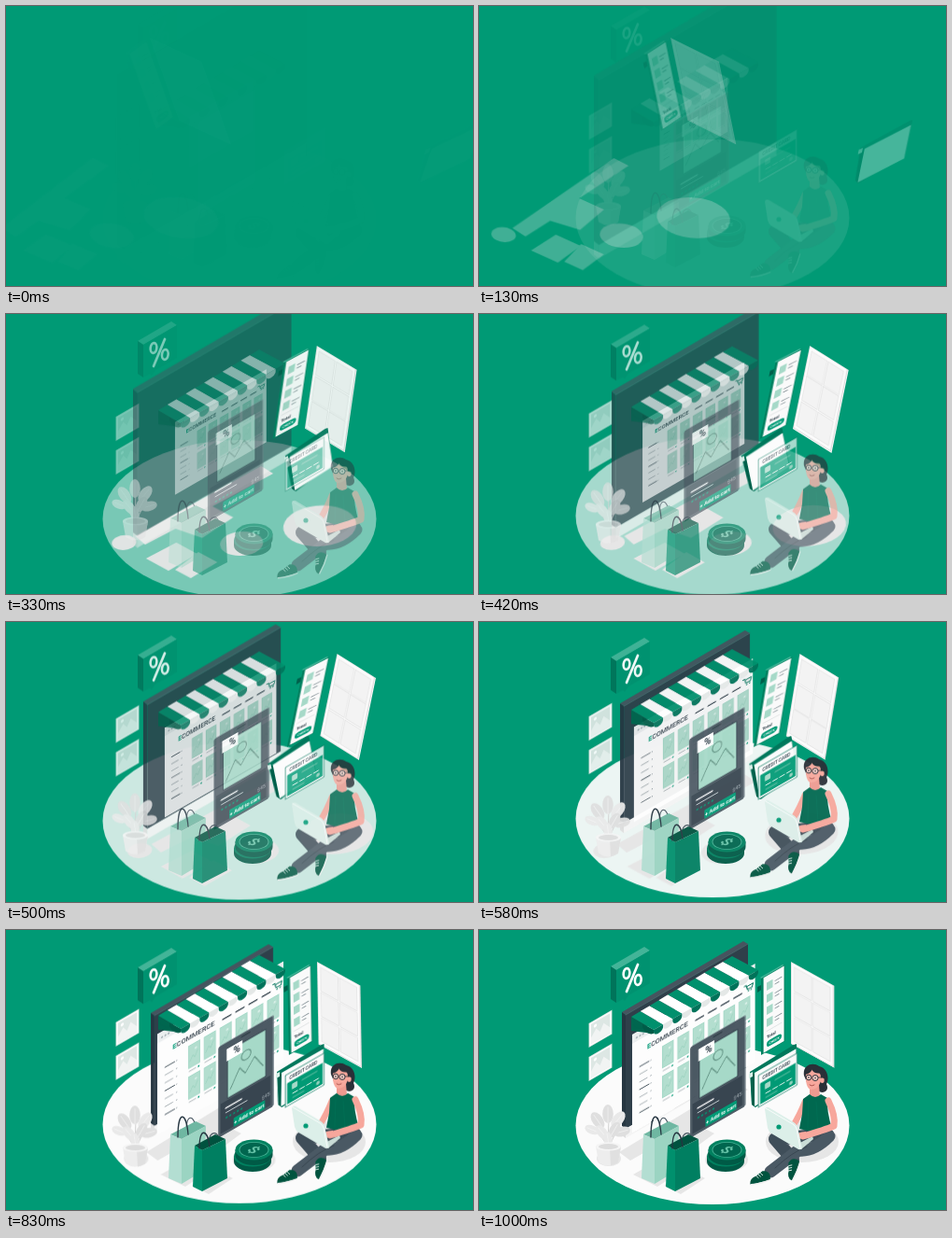
An HTML page that plays this animation: 500 by 300 pixels, repeating every 1040 ms.

```html
<!DOCTYPE html>
<html lang="en">
<head>
<meta charset="utf-8">
<title>Online shop</title>
<style>
  html, body { margin: 0; width: 100%; height: 100%; overflow: hidden; background: #009a75; }
  svg { display: block; width: 500px; height: 300px; font-family: Roboto, Inter, sans-serif; }
  svg > g { transform-box: fill-box; transform-origin: center; }
</style>
</head>
<body>
<svg id="stage" viewBox="0 0 500 300"></svg>
<script>
const GREEN = '#009a75', DEEP = '#00735a', DARK = '#263641', SLATE = '#3f4e59',
      MINT = '#a6d9c8', PALE = '#e6e6e6', SKIN = '#f7a79c';

// Shape helpers
const poly = (pts, fill, extra = '') => `<polygon points="${pts}" fill="${fill}" ${extra}/>`;
const rect = (x, y, w, h, fill, extra = '') =>
  `<rect x="${x}" y="${y}" width="${w}" height="${h}" fill="${fill}" ${extra}/>`;
const oval = (x, y, rx, ry, fill, extra = '') =>
  `<ellipse cx="${x}" cy="${y}" rx="${rx}" ry="${ry}" fill="${fill}" ${extra}/>`;
const shape = (d, fill, extra = '') => `<path d="${d}" fill="${fill}" ${extra}/>`;
const line = (d, color, width, extra = '') =>
  `<path d="${d}" fill="none" stroke="${color}" stroke-width="${width}" stroke-linecap="round" stroke-linejoin="round" ${extra}/>`;
const text = (x, y, size, fill, str, extra = '') =>
  `<text x="${x}" y="${y}" font-size="${size}" fill="${fill}" ${extra}>${str}</text>`;
const plane = (x, y, body, angle = -30) =>
  `<g transform="translate(${x} ${y}) skewY(${angle})">${body}</g>`;
const times = (n, fn) => Array.from({ length: n }, (_, i) => fn(i)).join('');

const floor = () => oval(250, 209.5, 146.5, 84.5, '#fbfbfb');

const shadows = () =>
  oval(139, 245, 13, 8, PALE) +
  poly('150,238 274,163 288,171 228,206 252,218 222,240 192,230 162,247', PALE) +
  poly('165,262 195,245 219,257 191,275', PALE) +
  poly('198,274 220,255 242,266 216,283', PALE) +
  oval(265, 246, 23, 13, PALE) +
  oval(346, 227, 39, 22, PALE);

const windowPanel = () => plane(334, 34,
  rect(0, 0, 46, 88, '#dcdcdc') + rect(.7, .5, 44, 86.5, '#fcfcfc') +
  times(6, i => rect(3.5 + i % 2 * 20, 4 + (i >> 1) * 27, 18.5, 25.5, '#f3f3f3', 'stroke="#dedede" stroke-width=".6"')),
  29);

const picture = y => plane(117.5, y,
  rect(0, 0, 25, 26, '#c9dcd6') + rect(.7, .6, 23.6, 24.8, '#fafafa') + rect(2.5, 2.5, 20, 21, '#dde7e4') +
  shape('M2.5 23.5V17L8 10L12 16L16 9L22.5 17V23.5Z', '#f1f4f3') + oval(7, 6.5, 1.7, 1.7, '#fff'));
const pictures = () => picture(100) + picture(136);

const percent = () =>
  poly('141,39 177,18 183,22 147,43', '#43b498') +
  poly('141,39 147,43 147,78 141,74', '#00745a') +
  shape('M147 43L183 22V57L160 70L156 76L154 74L147 78Z', '#009270') +
  oval(158, 46.5, 3.3, 5.4, 'none', 'stroke="#fff" stroke-width="2.6" transform="rotate(8 158 46.5)"') +
  oval(170.3, 53.5, 3.3, 5.4, 'none', 'stroke="#fff" stroke-width="2.6" transform="rotate(8 170.3 53.5)"') +
  line('M158 66L170 37', '#fff', 2.7);

const leaf = ([x, y, angle, len], i) => `<g transform="translate(${x} ${y}) rotate(${angle})">` +
  oval(0, 0, len * .58, len, i % 2 ? '#e9e9e9' : '#dfdfdf') + line(`M0 ${len}V${-len * .7}`, '#f6f6f6', .6) + '</g>';
const plant = () =>
  line('M138 234L139 200M138 232L125 212M139 232L153 204', '#d5d5d5', 1.1) +
  [[138, 197, 0, 10], [149, 203, 38, 10], [127, 204, -35, 10], [121, 214, -68, 8], [153, 216, 75, 9],
   [132, 217, -40, 9], [145, 214, 30, 9], [138, 224, -10, 8]].map(leaf).join('') +
  shape('M125 232L128 249Q138 256 149 249L152 232Z', '#ededed') +
  shape('M140 232L152 232L149 249Q145 252 141 252.5Z', '#e0e0e0') +
  oval(138.5, 232, 13.5, 4.5, '#f5f5f5') + oval(138.5, 232, 10.5, 3, '#dcdcdc');

const monitor = () =>
  poly('153,88 283,12 288,15 157,91', '#46545f') +
  poly('153,88 157,91 157,213 153,210', DARK) +
  poly('153,210 157,213 157,223 153,220', '#dedede') +
  poly('157,91 288,15 288,137 157,213', '#2f3f4a') +
  poly('157,213 288,137 288,147 157,223', '#f4f4f4') +
  line('M157 91L288 15', '#5a6973', .6);

const product = (col, row) => {
  const x = 32 + col * 16.4, y = 31 + row * 32;
  return rect(x, y, 12.5, 24, MINT) + rect(x + 1, y + 1, 10.5, 22, '#b3decf') +
    line(`M${x + 2} ${y + 17}l3-5 2 3 3-6`, '#8fcbb7', .6) + oval(x + 8, y + 6, 1.2, 1.2, '#d9efe8') +
    line(`M${x + 1} ${y + 27}h7`, '#a5adb1', .8) + oval(x + 11, y + 27, .9, .9, GREEN);
};
const screen = () => plane(164, 112,
  rect(0, 0, 131, 105, '#fdfdfd') + rect(0, 0, 131, 10, '#eceff0') +
  times(3, i => oval(5 + i * 3.4, 6, 1, 1, '#9aa7ad')) +
  text(16, 25.5, 7.2, '#35434d', `<tspan fill="${GREEN}" font-weight="700">E</tspan>COMMERCE`, 'font-weight="500"') +
  times(4, i => line(`M${68 + i * 13.6} 24h8.5`, '#35434d', 1.3)) +
  line('M120 18h2l1.5 5h5l1-3.6h-6', DEEP, 1) + oval(124.5, 25, .8, .8, DEEP) + oval(127.5, 25, .8, .8, DEEP) +
  times(7, i => line(`M8 ${39 + i * 8.2}h${i % 3 ? 8 : 10}`, i % 3 ? '#aab2b6' : '#4b5962', 1) +
    oval(20, 39 + i * 8.2, .6, .6, '#87939a')) +
  times(12, i => product(i % 6, Math.floor(i / 6))));

const awning = () => {
  const n = 11;
  const top = i => [163 + 108 * i / n, 93 - 65 * i / n];
  const low = i => [187 + 112 * i / n, 107 - 64 * i / n];
  const flap = (a, b, fill) =>
    shape(`M${a}L${b}v2C${b[0]} ${b[1] + 8} ${a[0]} ${a[1] + 8} ${a[0]} ${a[1] + 2}Z`, fill);
  return poly('163,93 187,107 187,111 163,108', '#00664f') +
    flap([163, 95], [175, 101], '#00664f') + flap([175, 101], [187, 107], '#005c48') +
    times(n, i => {
      const green = i % 2 === 0;
      return poly([top(i), top(i + 1), low(i + 1), low(i)].join(' '), green ? '#00906d' : '#fff') +
        flap(low(i), low(i + 1), green ? DEEP : '#e4e8e7');
    });
};

const list = () =>
  poly('298,61 304,58 304,63 298,67', '#00604b') +
  poly('301,51 325,37 328,39 304,53', '#43b498') +
  plane(302, 52, rect(0, 0, 25.5, 82, '#00805f') +
    rect(2.6, .8, 22, 80.4, '#fafafa') +
    times(4, i => rect(6, 8 + i * 13, 6.5, 8.5, MINT) +
      line(`M15 ${11 + i * 13}h7M15 ${14.5 + i * 13}h4`, '#7f8c92', .9)) +
    line('M6 60h16', '#d5d9da', .6) +
    text(6, 68, 4.4, DARK, 'Total', 'font-weight="700"') +
    rect(6, 71, 16, 6.5, GREEN, 'rx="3"') +
    text(14, 75.6, 3.5, '#fff', 'CHECK', 'font-weight="700" text-anchor="middle"'));

const phone = () =>
  plane(226, 126,
    rect(1.2, -.7, 58.5, 97, '#6c7a83', 'rx="1.5" fill-opacity=".8"') +
    rect(0, 0, 58.5, 97, '#42505b', 'rx="1.5" fill-opacity=".85"') +
    rect(2.5, 62, 53.5, 32, '#384550') +
    line('M25 3h9', '#25323b', 1) +
    rect(10, 10, 41, 50, MINT, 'stroke="#263641" stroke-width=".7"') +
    line('M13 52L23 35L29 44L39 32L48 47', '#5f8f80', 1) +
    oval(30, 25, 5, 5, 'none', 'stroke="#5f8f80" stroke-width="1"') +
    rect(9, 7, 17, 13, '#fff') +
    text(20, 17.5, 10, DARK, '%', 'font-weight="600" text-anchor="middle"') +
    line('M8 69.5h17', '#fff', 1.5) + line('M8 74.5h23', '#bfc9cd', .9) +
    times(5, i => oval(9 + i * 4, 80, 1.1, 1.1, GREEN)) +
    text(51, 83, 5.2, '#a9b4ba', '$45', 'text-anchor="middle"') +
    rect(16.5, 85, 33.5, 9.6, GREEN, 'rx="1"') +
    text(33.3, 91.7, 5.6, '#fff', '+ Add to cart', 'font-weight="700" text-anchor="middle"'));

const folder = () =>
  poly('290,152 337,123 340,122 340,160 296,190 292,187', '#00785c') +
  poly('291,153 295,155 296,190 292,187', '#00604b') +
  plane(295, 154, rect(0, -1, 44.5, 36, '#f4faf8') + rect(1.5, .5, 41.5, 33, '#fcfcfc')) +
  poly('289,154 293,152 293,157 289,159', '#d9efe8');

const card = () => plane(299, 156,
  rect(0, 0, 41.5, 34, '#fafafa', `stroke="${DEEP}" stroke-width=".7"`) +
  text(4.5, 7.5, 4.8, DARK, 'CREDIT CARD', 'font-weight="500"') +
  rect(2, 9.5, 38, 22.5, GREEN) +
  rect(7, 13, 6, 6, MINT, 'rx="1"') +
  times(4, i => line(`M${8 + i * 7.5} 23.5h5`, '#d9efe8', 1)) +
  line('M18 15h16M8 28h12', '#65bda4', 1) + oval(35, 28, 2, 2, '#8fd0bb'));

const coin = (x, y) =>
  shape(`M${x - 20} ${y}v5.5a20 11 0 0 0 40 0v-5.5Z`, '#005a46') +
  oval(x, y, 20, 11, '#00805f') + oval(x, y, 16, 8.4, '#46b295') + oval(x, y, 15, 7.7, '#00664f');
const coins = () => coin(264, 242.5) + coin(265.5, 235.5) +
  `<g transform="matrix(.87 .5 -.87 .5 265.5 235.5)">` +
  text(0, 5.4, 15, '#63c1a5', '$', 'font-weight="700" text-anchor="middle"') + '</g>';

const bags = () =>
  line('M193 216C193 195 202 199 203 212', '#46545f', 1.2) +
  poly('176,219 203,205 214,210 188,224', '#6fb7a2') +
  poly('176,219 188,224 188,272 174,266', '#b3ded2') +
  poly('188,224 214,210 213,257 188,272', '#9bd4c2') +
  line('M184 222C184 192 193 195 195 219', DARK, 1.3) +
  line('M217 228C218 214 228 215 228 226', '#46545f', 1.2) +
  poly('202,231 224,219 235,224 210,236', '#00523f') +
  poly('202,231 210,236 210,280 200,275', '#00906d') +
  poly('210,236 235,224 237,266 210,280', '#007f61') +
  line('M207 234C207 210 216 214 218 232', DARK, 1.3);

const shoe = (x, y, angle) => `<g transform="translate(${x} ${y}) rotate(${angle}) scale(.85)">` +
  shape('M-14 4Q-13 -3 -4 -4L5 -8Q13 -7 13 0L12 5H-13Z', '#00543f') +
  line('M-13 5Q0 7 12 5', '#f0f0f0', 1.6) + line('M-4-4L-2-1M-1-5L1-2M2-6L4-3', '#e7f3ef', 1) + '</g>';
const woman = () =>
  shape('M348 156C346 145 357 141 364 146C374 148 375 160 372 165C376 173 367 177 362 171L351 163Z', '#2a3038') +
  line('M373 219L317 224L336 246', SLATE, 14) +
  line('M375 221Q358 238 342 236L312 259', '#4a5964', 13) +
  line('M351 232Q335 238 317 255', '#35434d', .8) +
  shoe(336, 256, -68) + shoe(301, 266, -14) +
  line('M349 184Q343 199 336 210', SKIN, 6.5) +
  shape('M354 166H364L365 178Q360 184 354 178Z', '#ee9a90') +
  shape('M347 181L354 176Q360 182 366 176L373 180Q372 194 378 213Q362 219 343 213L346 197Z', '#00684f') +
  line('M353 183L352 212M361 184L363 213', '#007459', .5) +
  shape('M350 152Q349 169 355 171Q363 171 366 162L367 153Q359 155 356 149Q354 153 350 152Z', SKIN) +
  oval(367.5, 161, 2.2, 2.9, SKIN) +
  shape('M349 155Q349 145 358 144Q370 146 370 159L366 158Q366 151 357 149Q355 154 349 155Z', '#2a3038') +
  oval(353, 158, 2.8, 2.8, '#fbd0c8', 'stroke="#2a3038" stroke-width="1"') +
  oval(360, 158.5, 3.1, 3, '#fbd0c8', 'stroke="#2a3038" stroke-width="1"') +
  line('M363 158L367 158', '#2a3038', .8) + oval(353, 158, .7, .9, DARK) + oval(360, 158.5, .7, .9, DARK) +
  line('M354 166Q356 168 359 166', '#9b403c', .8) +
  poly('338,231 357,221 358,224 345,235', '#c9dcd6') +
  line('M374 183Q382 199 380 210Q371 214 347 221', SKIN, 7) +
  shape('M350 216Q340 216 339 222Q344 225 352 222Z', SKIN) +
  shape('M339 206Q331 207 330 212L338 214Z', SKIN) +
  shape('M306 192Q307 189 310 190L337 206Q340 208 341 211L346 233Q346 236 342 235L313 218Q310 216 309 212Z', '#dcefe9') +
  line('M307 191L336 208Q339 210 340 213L344 234', '#fff', .8) +
  oval(321, 211, 2.6, 2.6, GREEN);

// Motion
const EASE = 'cubic-bezier(.36,-.01,.5,1.38)';
const enter = transform => [{ opacity: 0, transform }, { opacity: 1, transform: 'none' }];
const slide = (x, y) => enter(`translate(${x}px,${y}px)`);
const zoom = from => [{ opacity: 0, transform: `scale(${from})` }, { opacity: 1, transform: 'scale(1)' }];
const dash = side => {
  const pose = (offset, x, skew, opacity = 1) =>
    ({ offset, opacity, transform: `translateX(${side * x}px) skewX(${-side * skew}deg)` });
  return [pose(0, 162.5, 20, 0), pose(.6, 0, -10), pose(.8, 0, 2), pose(1, 0, 0)];
};
const UP = slide(0, 19.5), DOWN = slide(0, -19.5), FADE = [{ opacity: 0 }, { opacity: 1 }];

const parts = [
  [floor, UP], [shadows, dash(-1)], [windowPanel, dash(-1)], [pictures, UP],
  [percent, DOWN], [monitor, zoom(1.5)], [screen, zoom(.5)], [plant, DOWN],
  [awning, UP], [list, dash(-1)], [phone, slide(-19.5, 0)], [folder, dash(1)],
  [card, FADE], [coins, FADE], [bags, FADE], [woman, UP]
];

const stage = document.getElementById('stage');
stage.innerHTML = parts.map(([draw]) => `<g>${draw()}</g>`).join('');

const anims = parts.map(([, steps], i) => {
  const anim = stage.children[i].animate(
    steps.map(step => ({ ...step, easing: EASE })), { duration: 1000, fill: 'both' });
  anim.pause();
  return anim;
});

// The picture advances in 24 steps per second, 25 steps per loop.
const LOOP = 1040, STEP = 1000 / 24;
const start = performance.now();
function render() {
  const t = (performance.now() - start) % LOOP;
  const step = Math.min(24, Math.floor((t + 4) / STEP));
  const time = Math.min(1000, (step + 1) * STEP);
  for (const anim of anims) anim.currentTime = time;
  requestAnimationFrame(render);
}
render();
</script>
</body>
</html>
```
